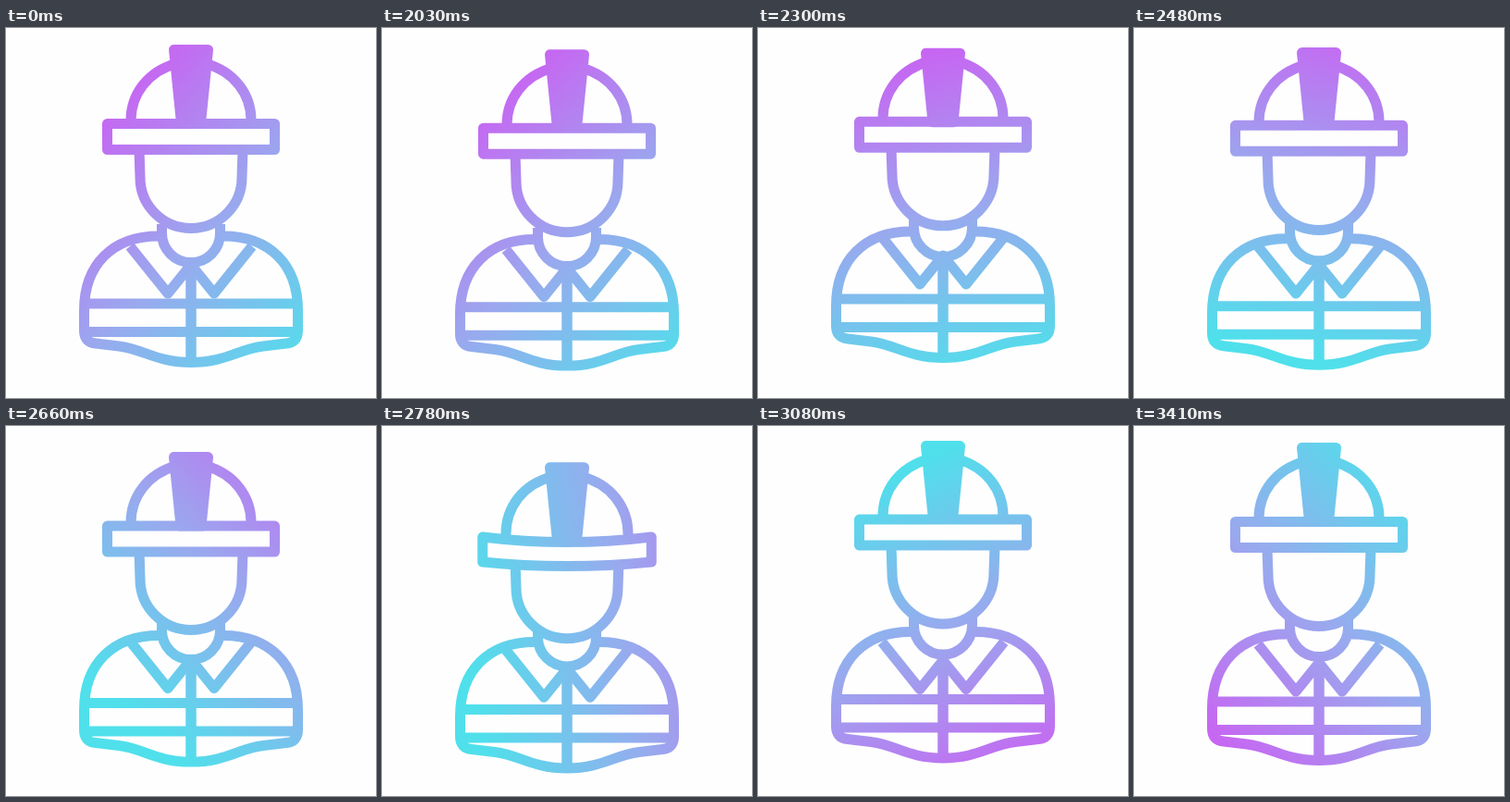
Write an HTML page without scripts that moves like this. It is 400x400 px and loops after 3.44 s.

```html
<!DOCTYPE html>
<html lang="en">
<head>
<meta charset="utf-8">
<title>Builder icon</title>
<style>
  @property --ridge  { syntax: "<length>"; inherits: true; initial-value: 0px; }
  @property --hat    { syntax: "<length>"; inherits: true; initial-value: 0px; }
  @property --face   { syntax: "<length>"; inherits: true; initial-value: 0px; }
  @property --neck   { syntax: "<length>"; inherits: true; initial-value: 0px; }
  @property --collar { syntax: "<length>"; inherits: true; initial-value: 0px; }
  @property --torso  { syntax: "<length>"; inherits: true; initial-value: 0px; }
  @property --shift  { syntax: "<length>"; inherits: true; initial-value: 0px; }
  @property --turn   { syntax: "<angle>";  inherits: true; initial-value: -135deg; }

  html, body { margin: 0; width: 100%; height: 100%; overflow: hidden; background: #fefefe; }
  svg { display: block; width: 100%; height: 100%; animation: pose 3440ms linear infinite; }

  .lines { fill: none; stroke: #fff; stroke-width: 11; stroke-linejoin: round; }
  .ridge  { fill: #fff; transform: translateY(var(--ridge)); }
  .face   { transform: translateY(var(--face)); }
  .neck   { transform: translateY(var(--neck)); }
  .collar { transform: translateY(var(--collar)); }
  .hat    { transform: translateY(var(--hat)); }
  .torso  { transform: translateY(var(--torso)); }
  .hat path   { animation: bend 3440ms linear infinite; }
  .torso path { animation: squash 3440ms linear infinite; }
  .paint { transform: translate(200px, 205px) rotate(var(--turn)) translateX(var(--shift)); }

  /* Vertical offset of each part, plus the direction of the colour sweep */
  @keyframes pose {
    0%, 58.98% { --ridge: 0px; --hat: 0px; --face: 0px; --neck: 4px; --collar: 0px; --torso: 0px; --turn: -135deg; --shift: -25px; }
    59.01% { --ridge: 5px; --hat: 4.5px; --face: 4px; --neck: 8px; --collar: 3.5px; --torso: 3.5px; --turn: -132deg; --shift: -25px; }
    61.63% { --ridge: 26px; --hat: 18px; --face: 17px; --neck: 13px; --collar: 9px; --torso: 9px; }
    66.86% { --ridge: 4px; --hat: -2px; --face: -2.5px; --neck: -2px; --collar: -10px; --torso: -5px; --turn: -105deg; --shift: 0px; }
    69.48% { --ridge: -17px; --hat: -17px; --face: -15px; --neck: -12px; --collar: -11px; --torso: -9px; }
    73.55% { --ridge: 14px; --hat: 12px; --face: 11px; --neck: 10px; --collar: 6px; --torso: 9px; }
    77.33% { --ridge: 10px; --hat: 4.5px; --face: 4px; --neck: 3px; --collar: -3.5px; --torso: 1.5px; --turn: -47deg; --shift: 55px; }
    81.1%  { --ridge: 22px; --hat: 16px; --face: 14px; --neck: 11px; --collar: 7px; --torso: 9px; }
    84.3%  { --ridge: 30px; --hat: 19px; --face: 19px; --neck: 13px; --collar: 5px; --torso: 3px; --turn: 27deg; --shift: 75px; }
    86.92% { --ridge: -16px; --hat: -17px; --face: -15px; --neck: -12px; --collar: -9px; --torso: -9px; }
    89.53% { --ridge: -2px; --hat: -2.5px; --face: -2.5px; --neck: -2.5px; --collar: -2.5px; --torso: -2.5px; --turn: 65deg; --shift: 15px; }
    93%    { --ridge: 1px; --hat: 1px; --face: 1px; --neck: 1px; --collar: 1px; --torso: 1px; }
    95.64%, 100% { --ridge: 0px; --hat: 0px; --face: 0px; --neck: 0px; --collar: 0px; --torso: 0px; }
    99.13%, 100% { --turn: 135deg; --shift: 0px; }
  }

  /* Left half of the helmet: dome and brim */
  @keyframes bend {
    0%, 59.01%, 66.86%, 77.33%, 86.92%, 100% {
      d: path("M135 104L135 100C135 72 153 47 184 38.5M200 103.5Q154.75 103.5 109.5 103.5L109.5 131.5Q154.75 131.5 200 131.5");
    }
    61.63%, 84.3% {
      d: path("M133 108L133 103C133 73 152 48 184 40.5M200 117Q154 117 108 106L108 132Q154 141 200 141");
    }
  }

  /* Left half of the jacket: outline, two stripes and zip */
  @keyframes squash {
    0%, 59.01%, 66.86%, 81.1%, 86.92%, 100% {
      d: path("M165 225C115 225 84.5 256 84.5 305.5L84.5 327Q84.5 340 97 341L122 344C150 347.5 162 361.5 200 361.5M84.5 298L200 298M84.5 328.5L200 328.5M200 258L200 361");
    }
    61.63%, 84.3% {
      d: path("M165 226C114 227 82.5 258 82.5 309L82.5 328Q82.5 339.5 97 340.5L125 341.5C152 344 164 360.5 200 360.5M82.5 309L200 309M82.5 335L200 335M200 262L200 360");
    }
  }
</style>
</head>
<body>
<svg viewBox="0 0 400 400">
  <defs>
    <linearGradient id="sweep" gradientUnits="userSpaceOnUse" x1="-180" x2="180" y1="0" y2="0">
      <stop offset="0" stop-color="#4fe0eb"/>
      <stop offset=".5" stop-color="#99a9ee"/>
      <stop offset="1" stop-color="#c864f2"/>
    </linearGradient>
    <mask id="builder" maskUnits="userSpaceOnUse" x="0" y="0" width="400" height="400">
      <g class="lines">
        <g class="torso">
          <path/>
          <g transform="matrix(-1 0 0 1 400 0)"><path/></g>
        </g>
        <path class="collar" d="M134 236L175 287L200 256L225 287L266 236"/>
        <path class="neck" d="M168.5 208V218A31.5 31.5 0 0 0 231.5 218V208"/>
        <path class="face" d="M144 132L145 161.5A55 55 0 0 0 255 161.5L256 132"/>
        <g class="hat">
          <path/>
          <g transform="matrix(-1 0 0 1 400 0)"><path/></g>
        </g>
        <path class="ridge" d="M181.5 23.5H218.5L211 98H189Z"/>
      </g>
    </mask>
  </defs>
  <g mask="url(#builder)">
    <rect class="paint" x="-500" y="-500" width="1000" height="1000" fill="url(#sweep)"/>
  </g>
</svg>
</body>
</html>
```
